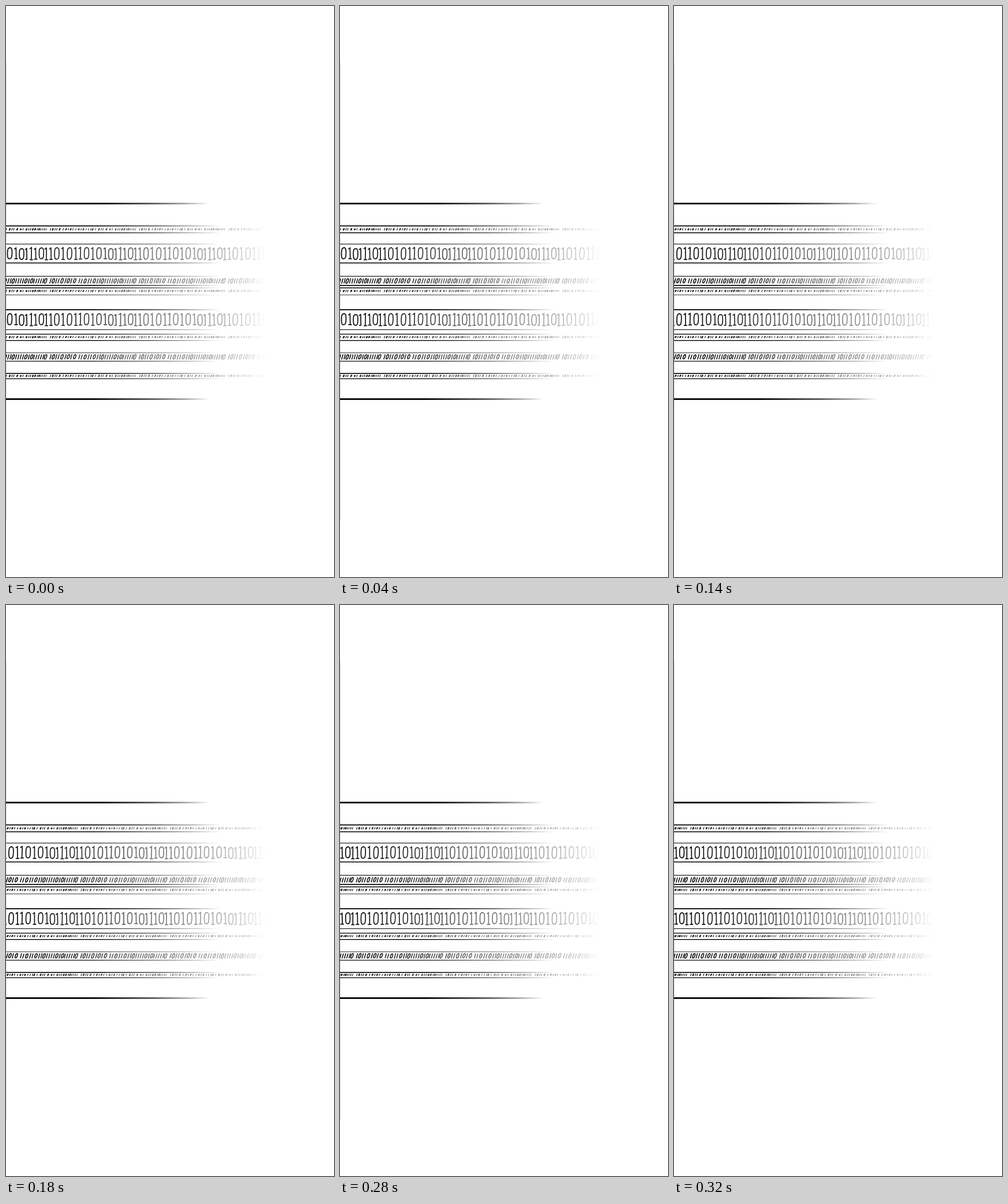
These frames come from a looping animation (568x987 px, 0.35 s). An HTML page:

```html
<!DOCTYPE html>
<html lang="en">
<head>
<meta charset="utf-8">
<title>Binary stream</title>
<style>
html, body { margin: 0; width: 100%; height: 100%; overflow: hidden; background: #fff; }
svg { display: block; width: 568px; height: 987px; }
</style>
</head>
<body>
<svg viewBox="0 0 568 987" fill="none" stroke-linecap="round" stroke-linejoin="round">
  <defs>
    <linearGradient id="fade" gradientUnits="userSpaceOnUse" x1="0" x2="450" y1="0" y2="0">
      <stop offset="0" stop-color="#fff" stop-opacity=".96"/>
      <stop offset=".25" stop-color="#fff" stop-opacity=".82"/>
      <stop offset=".5" stop-color="#fff" stop-opacity=".56"/>
      <stop offset=".7" stop-color="#fff" stop-opacity=".42"/>
      <stop offset=".82" stop-color="#fff" stop-opacity=".31"/>
      <stop offset=".93" stop-color="#fff" stop-opacity=".16"/>
      <stop offset="1" stop-color="#fff" stop-opacity="0"/>
    </linearGradient>
    <linearGradient id="rule" gradientUnits="userSpaceOnUse" x1="0" x2="372" y1="0" y2="0">
      <stop offset=".4" stop-color="#000"/>
      <stop offset=".7" stop-color="#000" stop-opacity=".65"/>
      <stop offset=".88" stop-color="#000" stop-opacity=".3"/>
      <stop offset="1" stop-color="#000" stop-opacity="0"/>
    </linearGradient>
    <linearGradient id="edge" gradientUnits="userSpaceOnUse" x1="0" x2="353" y1="0" y2="0">
      <stop offset=".42" stop-color="#000"/>
      <stop offset=".72" stop-color="#000" stop-opacity=".65"/>
      <stop offset=".88" stop-color="#000" stop-opacity=".33"/>
      <stop offset="1" stop-color="#000" stop-opacity="0"/>
    </linearGradient>
    <mask id="veil" maskUnits="userSpaceOnUse" x="0" y="370" width="455" height="290">
      <rect y="370" width="455" height="290" fill="url(#fade)"/>
    </mask>
  </defs>
  <path d="M.5 98V889" stroke="#dedede" stroke-linecap="butt"/>
  <g id="rules"></g>
  <g mask="url(#veil)"><g id="digits" stroke="#000"></g></g>
</svg>
<script>
const TILE = 154.5, START = 75, STEP = 26.7, HOLD = 70, FRAMES = 5;
const $ = id => document.getElementById(id);

// Each digit string is paired with its offsets inside one tile; j is a one with a left foot.
const big = {
  text: '1010110101 0j1101'.replace(' ', ''),
  at: [3, 13, 24, 35, 46, 54, 64.5, 75.5, 86, 97, 106.5, 115.5, 123.5, 131, 140.8, 149.5],
  h: 10, w: 3.9, lean: 0, pen: 1.75
};
const mid = {
  text: '1011010101101101101111010111110',
  at: [2, 7, 12, 16, 22, 28, 33, 38, 44, 52, 56, 62, 68, 72, 78, 83.5, 87.5,
       92, 97, 101, 105, 109, 114, 119, 124, 128, 132, 136, 140, 144, 148],
  h: 3.8, w: 1.8, lean: 1.1, pen: 1.6
};
const tiny = {
  text: '1011010101101011101011001011001011111',
  at: [2, 6, 10, 13, 18, 24, 29, 33, 37, 41, 46, 51, 55, 59, 64, 68, 72, 75, 80,
       86, 90, 93, 99, 105, 109, 115, 119, 122, 126, 130, 134, 137, 140, 143, 146, 149],
  h: 1.7, w: .85, lean: .5, pen: 1.25
};

// Small repeatable wobble in -1..1
const wobble = n => {
  const s = Math.sin(n * 127.1 + 3.7) * 4375.85;
  return (s - Math.floor(s)) * 2 - 1;
};
const f = n => n.toFixed(2);

function zero(x, y, w, h, k) {
  const p = (dx, dy) => f(x + dx * w - dy * k) + ' ' + f(y + dy * h);
  return `M${p(0, -1)}C${p(.85, -1.02)} ${p(1, -.75)} ${p(1, -.1)}` +
    `C${p(1, .7)} ${p(.8, 1)} ${p(-.1, 1)}` +
    `C${p(-.85, 1)} ${p(-1, .7)} ${p(-1, 0)}C${p(-1, -.7)} ${p(-.85, -1)} ${p(.1, -1)}`;
}

function one(x, y, w, h, k, kind) {
  let d = `M${f(x + k)} ${f(y - h)}L${f(x - k)} ${f(y + h)}`;
  if (h < 6) return d;
  d += `M${f(x - w * .65)} ${f(y - h * .8)}L${f(x)} ${f(y - h)}`;
  const right = kind === 'j' ? 0 : w * .6;
  return d + `M${f(x - w * .6)} ${f(y + h)}H${f(x + right)}`;
}

function row(set, y, seed) {
  let d = '';
  for (let tile = -2; tile < 4; tile++) {
    set.at.forEach((pos, i) => {
      const x = START + tile * TILE + pos;
      const kind = set.text[i];
      const size = set === tiny ? .62 + .35 * Math.abs(wobble(i + 9)) : 1 + wobble(i) * .07;
      const h = set.h * size, cy = y + wobble(i + 20) * set.h * .08;
      const k = set.lean + wobble(i + 40) * set.h * .035;
      d += kind === '0' ? zero(x, cy, set.w, h, k) : one(x, cy, set.w, h, k, kind);
    });
  }
  return `<path d="${d}" stroke-width="${set.pen}"/>`;
}

$('digits').innerHTML =
  [428, 542].map(y => row(big, y)).join('') +
  [475.2, 606.5].map(y => row(mid, y)).join('') +
  [386, 492.5, 572.3, 639.3].map(y => row(tiny, y)).join('');

const bar = (y, h, paint, w) =>
  `<rect y="${y - h / 2}" width="${w}" height="${h}" fill="url(#${paint})"/>`;
const lines = [
  [380.2, 1.7], [392, 1.5], [411.5, 1], [444.2, 1.5], [467.2, 1.1], [483, 1.7],
  [487.3, 1.5], [499.3, .8], [525, 1.8], [559.5, 1], [567.3, 1.3], [578.3, 1.4],
  [599.5, .8], [614, 1.2], [635.2, 1.6], [644.3, 1.3]
];
$('rules').innerHTML =
  lines.map(([y, h]) => bar(y, h, 'rule', 372)).join('') +
  [341.5, 679.5].map(y => bar(y, 2.8, 'edge', 353)).join('');

function draw(ms) {
  const step = Math.floor(ms / HOLD) % FRAMES;
  $('digits').setAttribute('transform', `translate(${f(step * STEP)} 0)`);
}

const t0 = performance.now();
function tick() {
  draw(performance.now() - t0);
  requestAnimationFrame(tick);
}
draw(0);
requestAnimationFrame(tick);
</script>
</body>
</html>
```
